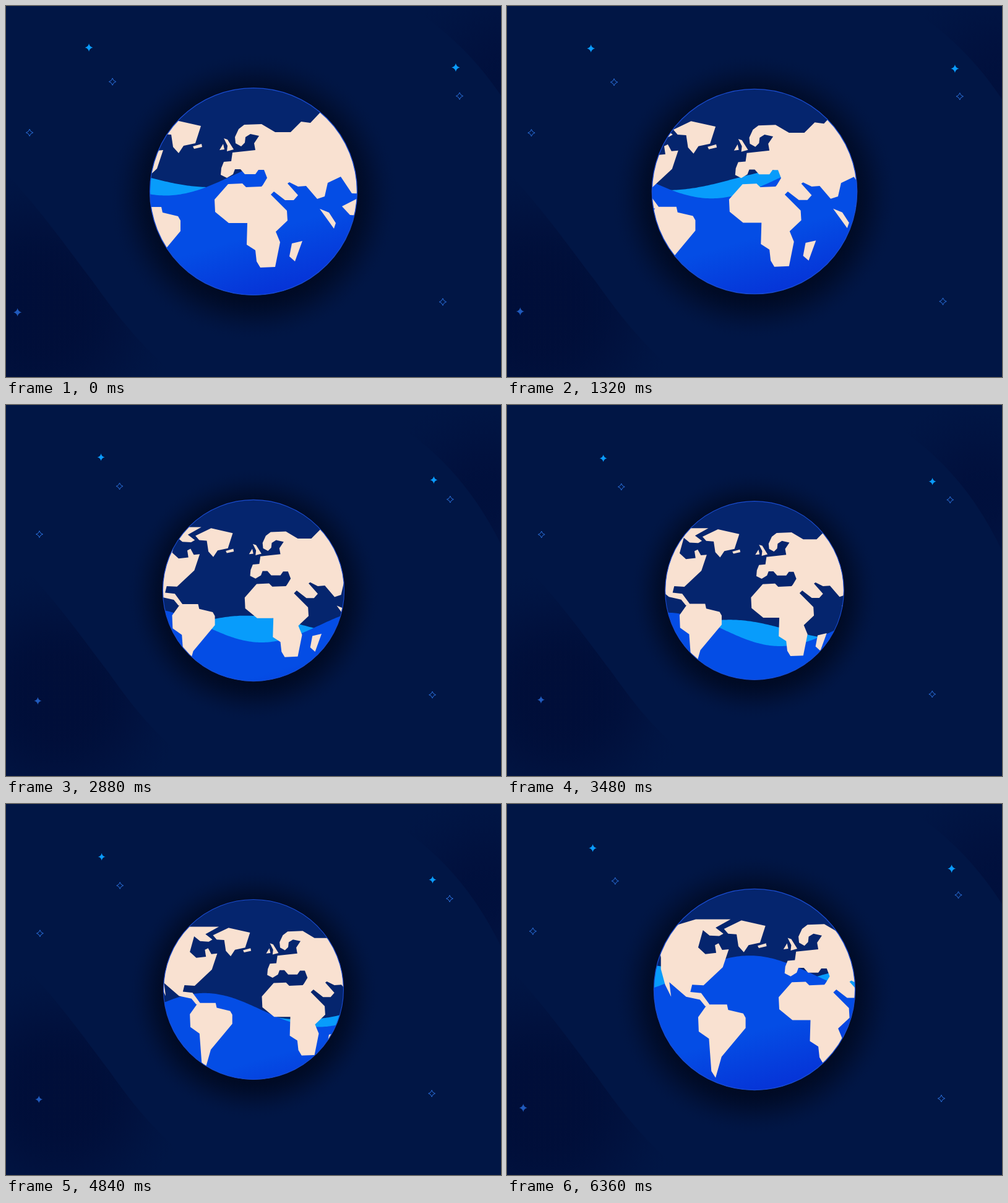
An HTML page with a canvas that plays this animation: 800 px wide and 600 px high, repeating every 6.4 s.

```html
<!DOCTYPE html>
<html lang="en">
<head>
<meta charset="utf-8">
<title>Globe</title>
<style>
  html, body { margin: 0; width: 100%; height: 100%; overflow: hidden; background: #011645; }
  canvas { display: block; width: 800px; height: 600px; }
</style>
</head>
<body>
<canvas id="stage" width="800" height="600"></canvas>
<script>
const ctx = document.getElementById('stage').getContext('2d');
const LOOP = 6400, STEP = 40;
const CX = 400, CY = 300;
const R = 167.5;              // globe radius at full zoom
const DRIFT = 0.016226;       // land, px per ms
const FLOW = 0.0545;          // waves, px per ms
const WAVELENGTH = 426;

const poly = points => new Path2D('M' + points + 'Z');

// Corner points of each coast, at full zoom and time 0
const land = {
  northAmerica: poly('132,197 169,192 199,183 257,183 232,197 245,207 238,211 222,210 211,201 203,230 215,241 233,239 231,226 237,223 243,234 254,233 244,263 212,293 193,292 190,304 208,306 222,325 215,328 206,317 183,312 155,288 158,312 148,292 141,266 141,247'),
  southAmerica: poly('203,346 218,325 251,325 253,334 278,340 282,347 282,364 242,412 232,447 225,436 221,382 204,370'),
  greenland: poly('246,199 275,185 315,194 306,222 287,226 279,238 270,228 267,208 253,207'),
  iceland: poly('302,227 316,223 317,228 304,231'),
  ireland: poly('345,233 351,223 353,232'),
  britain: poly('352,214 358,216 368,232 357,235 358,226'),
  eurasia: poly('370,212 376,199 385,192 413,191 435,204 460,204 477,187 492,189 508,172 620,100 620,305 559,303 541,276 520,286 515,308 503,312 485,291 472,292 458,285 455,287 472,306 465,314 451,314 433,300 428,302 413,293 422,278 417,265 408,265 403,272 386,272 379,264 370,264 367,272 357,278 347,273 348,262 352,252 364,251 366,237 403,233 401,222 409,210 395,207 387,212 386,221 380,227 371,222'),
  africa: poly('359,288 337,313 338,333 360,351 390,351 389,386 403,395 405,413 411,423 435,422 443,382 436,365 455,347 454,331 428,305 433,300 425,280 413,292 388,293 382,287'),
  madagascar: poly('462,384 479,380 467,413 458,405'),
  sumatra: poly('507,328 522,334 533,351 530,360'),
  indochina: poly('543,324 590,300 590,340 556,338')
};

// Position at the far end of the zoom; deeper stars move more
const stars = [
  { x: 156, y: 86.5, depth: 0.09, fill: '#0a9bfc' },
  { x: 687, y: 124, depth: 0.139, fill: '#0a9bfc' },
  { x: 55.5, y: 476.5, depth: 0.107, fill: '#205abc' },
  { x: 185, y: 132.5, depth: 0.06 },
  { x: 56, y: 209.5, depth: 0.052 },
  { x: 716, y: 153.5, depth: 0.054 },
  { x: 687, y: 467.5, depth: 0.066 }
];

// Symmetric ease in and out: cubic-bezier(a, 0, 1 - a, 1)
function ease(x, a) {
  if (x <= 0) return 0;
  if (x >= 1) return 1;
  let lo = 0, hi = 1;
  for (let i = 0; i < 24; i++) {
    const s = (lo + hi) / 2, u = 1 - s;
    if (3 * u * u * s * a + 3 * u * s * s * (1 - a) + s * s * s < x) lo = s;
    else hi = s;
  }
  return lo * lo * (3 - 2 * lo);
}

const span = (t, from, to, a) => ease((t - from) / (to - from), a);
const zoomAt = t => 1 - span(t, 430, 3920, 0.65) + span(t, 3920, 7820, 0.65);
const levelAt = t => -25 + 98 * (span(t, 800, 3550, 0.55) - span(t, 3650, 6400, 0.55));

// Draws around the stage centre at the given scale
function zoomed(scale, draw) {
  ctx.save();
  ctx.translate(CX, CY);
  ctx.scale(scale, scale);
  draw();
  ctx.restore();
}

// Radial fade of one dark tone, from full alpha inside r0 to none at r1
function shade(x, y, r0, r1, tone, alpha) {
  const g = ctx.createRadialGradient(x, y, r0, x, y, r1);
  for (let i = 0; i <= 8; i++) {
    const fade = (1 + Math.cos(Math.PI * i / 8)) / 2;
    g.addColorStop(i / 8, `rgba(${tone},${alpha * fade})`);
  }
  return g;
}

function drawSky(zoom) {
  ctx.fillStyle = '#011645';
  ctx.fillRect(0, 0, 800, 600);
  zoomed((1 + 0.12 * zoom) / 1.12, () => {
    ctx.translate(-CX, -CY);
    ctx.fillStyle = shade(50, 490, 50, 240, '0,11,52', 0.7);
    ctx.fill(new Path2D('M-80,190 C30,290 90,380 140,445 C190,515 225,560 310,625 L-80,660Z'));
    ctx.fillStyle = shade(810, 130, 10, 200, '0,11,54', 0.55);
    ctx.fill(new Path2D('M590,-30 C690,10 760,85 800,145 Q840,205 860,260 L900,-80Z'));
  });
}

function drawStar({ x, y, depth, fill }, zoom) {
  const k = 1 + depth * zoom, r = (fill ? 5.9 : 5.4) * k, waist = r * 0.18;
  ctx.save();
  ctx.translate(CX + (x - CX) * k, CY + (y - CY) * k);
  ctx.beginPath();
  for (let i = 0; i < 4; i++) {
    ctx.lineTo(0, -r);
    ctx.quadraticCurveTo(waist, -waist, r, 0);
    ctx.rotate(Math.PI / 2);
  }
  ctx.closePath();
  if (fill) {
    ctx.fillStyle = fill;
    ctx.fill();
  } else {
    ctx.strokeStyle = '#2a70dc';
    ctx.stroke();
  }
  ctx.restore();
}

function drawWave(level, height, trough, fill) {
  const edge = R + 5;
  ctx.beginPath();
  ctx.moveTo(-edge, edge);
  for (let x = -edge; x <= edge; x += 3) {
    ctx.lineTo(x, level + height * Math.cos((x - trough) * 2 * Math.PI / WAVELENGTH));
  }
  ctx.lineTo(edge, edge);
  ctx.fillStyle = fill;
  ctx.fill();
}

// Darkens towards the lower right, tied to the water level
function seaFill(level) {
  const near = level + 95, far = level + 205;
  const g = ctx.createLinearGradient(0.27 * near, 0.92 * near, 0.27 * far, 0.92 * far);
  g.addColorStop(0, '#044de5');
  g.addColorStop(1, '#0632d6');
  return g;
}

function drawGlobe(t, zoom) {
  const level = levelAt(t);
  zoomed(144 / R * (1 + 0.163 * zoom), () => {
    const disc = new Path2D();
    disc.arc(0, 0, R, 0, 2 * Math.PI);

    ctx.fillStyle = shade(0, 9, R * 0.88, R * 1.4, '0,8,30', 0.9);
    ctx.fillRect(-R * 1.5, -R * 1.5, R * 3, R * 3);

    ctx.save();
    ctx.clip(disc);
    ctx.fillStyle = '#05256e';
    ctx.fillRect(-R, -R, 2 * R, 2 * R);
    drawWave(level, 18, -70 - FLOW * t, '#089cfb');
    drawWave(level, 31.5, -142 + FLOW * t, seaFill(level));

    ctx.translate(DRIFT * t - CX, -CY);
    ctx.fillStyle = '#f9e1d1';
    Object.values(land).forEach(coast => ctx.fill(coast));
    ctx.restore();

    ctx.strokeStyle = '#1a4cd0';
    ctx.lineWidth = 1.3;
    ctx.stroke(disc);
  });
}

function frame() {
  const t = Math.floor(performance.now() % LOOP / STEP) * STEP;
  const zoom = zoomAt(t);
  drawSky(zoom);
  stars.forEach(star => drawStar(star, zoom));
  drawGlobe(t, zoom);
  requestAnimationFrame(frame);
}
frame();
</script>
</body>
</html>
```
